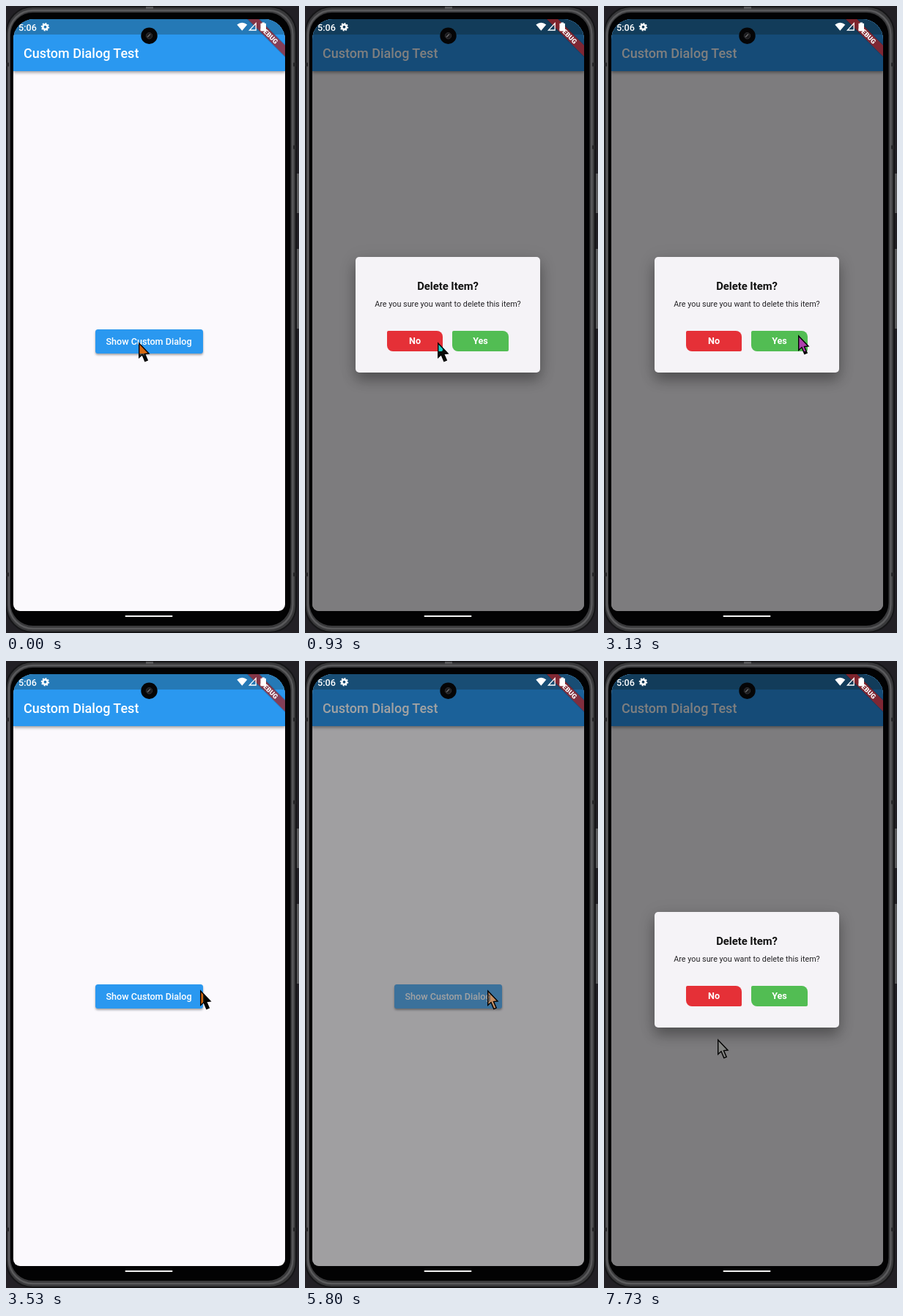
Write an HTML page that moves like this. It is 400x857 px and loops after 8 s.

```html
<!DOCTYPE html>
<html lang="en">
<head>
<meta charset="utf-8">
<title>Custom Dialog Test</title>
<style>
  html, body { margin: 0; width: 100%; height: 100%; overflow: hidden; background: #222025; }
  #stage { position: relative; width: 400px; height: 857px; overflow: hidden; isolation: isolate;
    background: #222025; font-family: Roboto, "Noto Sans", sans-serif; }
  #stage div, svg { position: absolute; }
  svg { left: 0; top: 0; overflow: visible; }
  text { font-family: Roboto, "Noto Sans", sans-serif; fill: #fff; }
  #screen { inset: 0; clip-path: inset(18px 19px 30px 10px round 28px 28px 9px 9px); background: #fbf9fd; }
  #bar { left: 10px; top: 18px; width: 371px; height: 71px; background: #2a98f0;
    box-shadow: 0 2px 4px rgba(0,0,0,.38); }
  #status { left: 10px; top: 18px; width: 371px; height: 21px; background: #2579b6; }
  #show { left: 122px; top: 442px; width: 147px; height: 33px; border-radius: 3.5px; background: #2a98f0;
    box-shadow: 0 2px 3px rgba(0,0,0,.35); }
  #splash { inset: 0; border-radius: 3.5px; background: #fff; }
  #dim { inset: 0; background: #000; }
  #dialog { left: 69px; top: 343px; width: 252px; height: 158px; border-radius: 5px; background: #f5f3f7;
    text-align: center; white-space: nowrap;
    box-shadow: 0 10px 18px rgba(0,0,0,.3), 0 4px 26px rgba(0,0,0,.1); }
  .line { left: 0; width: 100%; line-height: 20px; }
  #head { top: 30px; font-size: 14.8px; font-weight: 700; color: #111; }
  #ask { top: 55px; font-size: 10.8px; color: #242326; }
  .choice { top: 101px; height: 28px; line-height: 28px; border-radius: 2px 8px 2px 8px;
    font-size: 12.6px; font-weight: 700; color: #fff; }
  #no { left: 43px; width: 76px; background: #e53037; }
  #yes { left: 132px; width: 77px; background: #52bd53; }
  #invert { mix-blend-mode: difference; }
</style>
</head>
<body>
<div id="stage">
  <svg id="phone" width="400" height="857">
    <g fill="#59595b">
      <rect x="395" y="229" width="6" height="54" rx="1.5"/>
      <rect x="395" y="332" width="6" height="109" rx="1.5"/>
    </g>
    <rect x=".5" y="1" width="395.5" height="855" rx="36" fill="#39393b" stroke="#151517" stroke-width="2"/>
    <rect x="4" y="6" width="387.5" height="845" rx="33" fill="none" stroke="#5a5a5c" stroke-width="2.5"/>
    <rect x="6" y="9" width="382.5" height="838" rx="31" fill="#020203"/>
    <rect x="191" y="1" width="10" height="3" fill="#58585a"/>
    <path d="M392 80h4M392 193h4M0 80h4M392 777h4M0 777h4" stroke="#262628" stroke-width="5"/>
    <rect x="162.5" y="833" width="65" height="2" rx="1" fill="#f4f4f4"/>
  </svg>

  <div id="screen">
    <div id="bar"></div>
    <div id="status"></div>
    <div id="show"><div id="splash"></div></div>
    <svg width="400" height="857" font-weight="500">
      <text x="24" y="71.3" font-size="18">Custom Dialog Test</text>
      <text x="195" y="463" font-size="12.6" text-anchor="middle">Show Custom Dialog</text>
    </svg>
    <div id="dim"></div>
    <div id="dialog">
      <div id="head" class="line">Delete Item?</div>
      <div id="ask" class="line">Are you sure you want to delete this item?</div>
      <div id="no" class="choice">No</div>
      <div id="yes" class="choice">Yes</div>
    </div>
    <svg width="400" height="857">
      <g transform="translate(381 18) rotate(45)">
        <rect x="-50" y="24.4" width="100" height="12.6" fill="#000" opacity=".16"/>
        <rect x="-50" y="25.2" width="100" height="10.8" fill="#b71c1c" opacity=".66"/>
        <text y="33.9" font-size="9.2" font-weight="900" text-anchor="middle">DEBUG</text>
      </g>
      <text x="17" y="33.6" font-size="12.6" font-weight="500">5:06</text>
      <g fill="none" stroke="#fff">
        <circle cx="53.5" cy="28.7" r="3.2" stroke-width="2.6"/>
        <circle cx="53.5" cy="28.7" r="4.9" stroke-width="1.7" pathLength="16" stroke-dasharray="1 1"/>
        <path d="M341.2 23.6V33H332.4Z" stroke-width="1.3"/>
      </g>
      <path d="M315.3 25.4Q322.3 20 329.3 25.4L322.3 33.8Z" fill="#fff"/>
      <path d="M349.5 22.5h3.5v1.3h2v10.4h-7.5V23.8h2Z" fill="#fff"/>
      <circle cx="195.5" cy="40.7" r="11.2" fill="#050506"/>
      <circle cx="195.5" cy="40.7" r="4.2" fill="#1b1b1d" stroke="#303033"/>
      <path d="M193 42.5l4-4" stroke="#6a6a6c" stroke-width="1.4"/>
    </svg>
  </div>

  <svg id="invert" class="cursor" width="16" height="28"><path fill="#fff"/></svg>
  <svg class="cursor" width="16" height="28"><path fill="none" stroke="#000" stroke-width="1.4"/></svg>
</div>

<script>
  const LOOP = 8000, STEP = 1000 / 15;
  const FLIP_IN = 270, FLIP_OUT = 200;
  const OPEN = 530, CLOSE = 3333, REOPEN = 5800;
  const ARROW = "M.7 1V20.5L5 16.6L8.8 25.6L12.2 24.1L8.5 15.5L14 15Z";

  // Pointer moves: begin, end, x and y arrived at.
  const MOVES = [[0, 0, 181, 460], [930, 1270, 187, 454], [1667, 1867, 265, 450],
    [4933, 5133, 249, 450], [6933, 7200, 148, 576], [7700, 7733, 155, 517]];

  const el = id => document.getElementById(id);
  const cursors = document.querySelectorAll(".cursor");
  cursors.forEach(c => c.firstElementChild.setAttribute("d", ARROW));

  const clamp = v => Math.min(1, Math.max(0, v));
  const easeOut = p => 1 - (1 - p) ** 2;

  function pointer(t) {
    let x = 0, y = 0;
    for (const [begin, end, toX, toY] of MOVES) {
      const k = end > begin ? clamp((t - begin) / (end - begin)) : 1;
      x += (toX - x) * k;
      y += (toY - y) * k;
    }
    return `translate(${x}px, ${y}px)`;
  }

  // How far the dialog is open, and whether it is on its way in.
  function flip(t) {
    if (t < OPEN) return { p: 0, opening: false };
    if (t < CLOSE) return { p: clamp(.46 + (t - OPEN) / FLIP_IN), opening: true };
    if (t < REOPEN - 1) return { p: clamp(1 - (t - CLOSE) / FLIP_OUT), opening: false };
    return { p: clamp((t - REOPEN) / FLIP_IN), opening: true };
  }

  function draw(ms) {
    const t = Math.floor((ms + 3.5) / STEP) * STEP;
    const { p, opening } = flip(t);
    const shown = easeOut(p);
    el("splash").style.opacity = opening ? .24 : 0;
    el("dim").style.opacity = opening ? .365 + .135 * shown : .5 * shown;
    const { style } = el("dialog");
    style.opacity = shown;
    style.visibility = p > .01 ? "visible" : "hidden";
    style.transform = p < 1 ? `perspective(1680px) rotateY(${90 * (1 - p)}deg)` : "none";
    cursors.forEach(c => c.style.transform = pointer(t));
  }

  const start = performance.now();
  function tick() {
    draw((performance.now() - start) % LOOP);
    requestAnimationFrame(tick);
  }
  tick();
</script>
</body>
</html>
```
